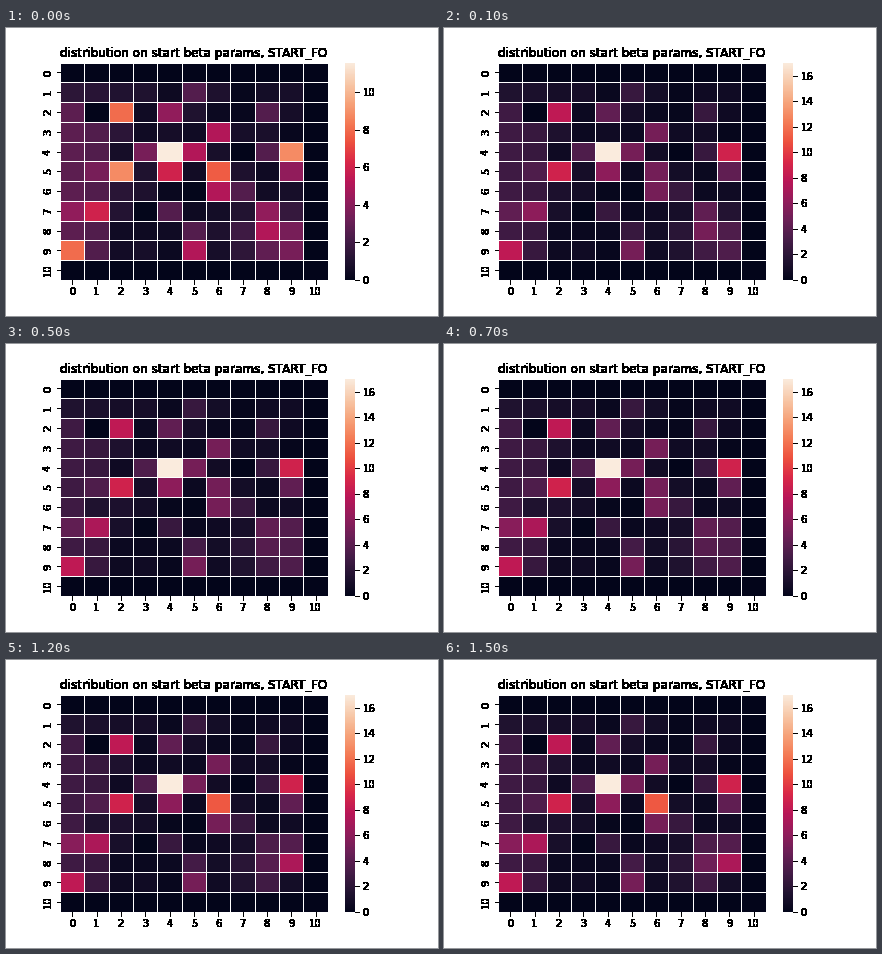
These frames come from a looping animation (432 by 288 pixels, 6200 ms). A matplotlib script:

```python
import numpy as np
import matplotlib.pyplot as plt
from matplotlib.animation import FuncAnimation
from matplotlib.colors import LinearSegmentedColormap, Normalize

W, H, DPI = 432, 288, 72
STEP, LOOP = 100, 6200
N = 11

plt.rcParams.update({"font.family": "DejaVu Sans", "font.size": 10})

ROCKET = LinearSegmentedColormap.from_list("rocket", [
    "#03051a", "#221331", "#451c47", "#6a1f56", "#921c5b", "#b91657",
    "#d92847", "#ed513e", "#f47c56", "#f6a47b", "#f7c9aa", "#faebdd"])

# Standout cells by level, as (row, column).
PEAKS = {
    11.57: [(4, 4)],
    8.8: [(4, 9), (5, 2)],
    8.0: [(2, 2), (9, 0)],
    7.6: [(5, 6)],
    6.0: [(5, 4), (7, 1)],
    5.1: [(3, 6), (4, 5), (6, 6), (8, 8), (9, 5)],
    4.2: [(2, 4), (5, 9), (7, 0), (7, 8)],
    3.5: [(4, 3), (5, 1), (8, 9), (9, 9)],
    2.5: [(1, 5), (2, 8), (4, 8), (6, 7), (7, 4), (8, 5)],
    0.0: [(2, 1)],
}

# (ms, cell, new value)
UPDATES = [
    (100, (4, 4), 17.05), (100, (5, 6), 5.0),
    (400, (6, 1), 1.4), (400, (7, 1), 7.2), (400, (8, 5), 3.0),
    (500, (7, 9), 3.7), (500, (8, 8), 3.8),
    (700, (7, 0), 5.8),
    (1100, (8, 9), 7.2), (1100, (9, 9), 0.9),
    (1200, (5, 6), 11.1), (1200, (7, 8), 3.4),
    (1500, (8, 8), 4.8), (1500, (8, 6), 0.9),
]


def base_grid():
    """Band on the left, a bump at the lower right, faint noise between."""
    row, col = np.mgrid[:N, :N]
    band = 2.8 * np.exp(-(col / 1.7) ** 4) * np.minimum(1, row / 2)
    bump = 3 * np.exp(-((row - 8.2) ** 2 + (col - 8.2) ** 2) / 2)
    noise = np.random.default_rng(4).uniform(0, 1, (N, N))
    grid = band + bump + noise * (col > 1)
    grid[[0, -1]] = 0
    grid[:, -1] = 0
    for level, cells in PEAKS.items():
        for cell in cells:
            grid[cell] = level
    return grid


BASE = base_grid()


def grid_at(ms):
    grid = BASE.copy()
    for start, cell, value in UPDATES:
        if ms >= start:
            grid[cell] = value
    return grid


def harden(img, dpi):
    """Make every touched pixel fully opaque."""
    out = img.copy()
    out[..., 3] = img[..., 3] > 0
    out[..., :3] = 0
    return out, 0, 0


LEFT, BOTTOM, SPAN, HEIGHT = 0.125, 0.125, 0.775, 0.755
MAP_BOX = [LEFT, BOTTOM, SPAN * 0.8, HEIGHT]
BAR_BOX = [LEFT + SPAN * 0.85, BOTTOM, HEIGHT * H / 20 / W, HEIGHT]

fig = plt.figure(figsize=(W / DPI, H / DPI), dpi=DPI, facecolor="white")


def add_layer(box):
    ax = fig.add_axes(box)
    ax.patch.set_visible(False)
    ax.spines[:].set_visible(False)
    ax.set_xticks([])
    ax.set_yticks([])
    return ax


heat = add_layer(MAP_BOX)
mesh = heat.pcolormesh(BASE, cmap=ROCKET, edgecolors="white", linewidth=0.5)
heat.set(xlim=(0, N), ylim=(N, 0))

ramp = add_layer(BAR_BOX)
ramp.pcolormesh(np.linspace(0, 1, 256)[:, None], cmap=ROCKET)

labels = add_layer(MAP_BOX)
labels.set(xlim=(0, N), ylim=(N, 0))
labels.set_xticks(np.arange(N) + 0.5, range(N))
labels.set_yticks(np.arange(N) + 0.5, range(N), rotation="vertical",
                  va="center")
labels.set_title("distribution on start beta params, START_FO", fontsize=12)

scale = add_layer(BAR_BOX)
scale.yaxis.tick_right()
for layer in (labels, scale):
    layer.set_agg_filter(harden)


def draw(i):
    grid = grid_at(i * STEP)
    top = grid.max()
    mesh.set_array(grid)
    mesh.set_norm(Normalize(0, top))
    ticks = range(0, int(top) + 1, 2)
    scale.set_ylim(0, top)
    scale.set_yticks(ticks, ticks)
    return [mesh]


anim = FuncAnimation(fig, draw, frames=LOOP // STEP, interval=STEP,
                     repeat=True, repeat_delay=0, blit=False)
plt.show()
```
